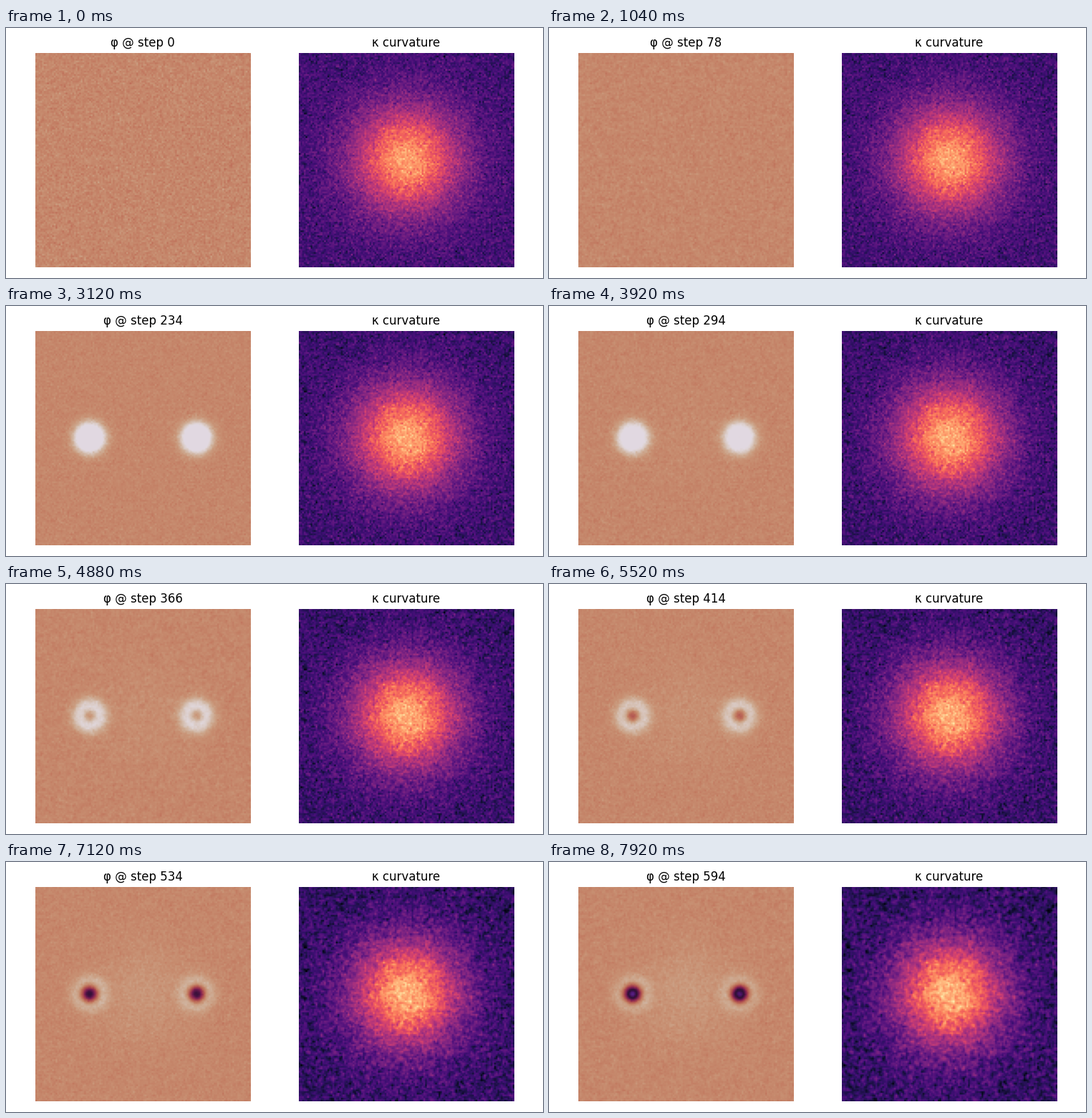
Animation of 750 by 350 pixels, one loop 8 s. Source, as a matplotlib script:

```python
import numpy as np
import matplotlib.pyplot as plt
from matplotlib.animation import FuncAnimation

W, H, DPI = 750, 350, 100
FRAMES, INTERVAL, STEPS_PER_FRAME = 100, 80, 6
LAST_STEP = (FRAMES - 1) * STEPS_PER_FRAME
N = 128             # grid cells per side
SIDE, BOTTOM = 300.5, 15
HALF = SIDE / 2
PULSE_STEP = 100

rng = np.random.default_rng(7)
axis = np.linspace(-HALF, HALF, N)
X, Y = np.meshgrid(axis, axis)
R2 = X**2 + Y**2
SPOTS = [(X - cx)**2 + Y**2 for cx in (-HALF / 2, HALF / 2)]
phi_a, phi_b, kappa_a, kappa_b = rng.standard_normal((4, N, N))


def level_of(cmap, rgb):
    """Colormap position whose colour is nearest to rgb."""
    grid = np.linspace(0, 1, 1024)
    dist = ((cmap(grid)[:, :3] * 255 - rgb)**2).sum(axis=1)
    return grid[dist.argmin()]


REST = level_of(plt.get_cmap("twilight"), (198, 136, 107))


def blur(f, s):
    """Mix each cell with its neighbours along both axes."""
    for ax in (0, 1):
        f = (1 - s) * f + s / 2 * (np.roll(f, 1, ax) + np.roll(f, -1, ax))
    return f


def noise(a, b, angle, smooth):
    f = blur(np.cos(angle) * a + np.sin(angle) * b, smooth)
    return f / f.std()


def progress(step, start):
    return max(0, (step - start) / (LAST_STEP - start))


def phi(step):
    grain = .008 + .005 * np.exp(-step / 50)
    smooth = .2 * np.sin(np.pi * step / 234)**2
    field = REST + grain * noise(phi_a, phi_b, step / 200, smooth)
    field += .028 * progress(step, 234) * np.exp(-R2 / 65**2)
    if step >= PULSE_STEP:
        # a fading bright spot, hollowed out by a narrower growing dip
        u = progress(step, PULSE_STEP)
        peak, dip = 1 - .27 * u, .44 + .73 * u
        for r2 in SPOTS:
            field += peak * np.exp(-r2 / 260) - dip * np.exp(-r2 / 175)
    return field


def kappa(step):
    t = progress(step, 0)
    floor, peak = .215 - .04 * t, .80 + .05 * t
    hill = floor + (peak - floor) * np.exp(-R2 / (.255 * HALF**2))
    return hill + .053 * noise(kappa_a, kappa_b, .6 * t, .33 * t**2)


def panel(center, data, cmap, title):
    ax = fig.add_axes([(center - HALF) / W, BOTTOM / H, SIDE / W, SIDE / H])
    ax.axis("off")
    image = ax.imshow(data, cmap=cmap, vmin=0, vmax=1)
    return image, ax.set_title(title, fontsize=12)


plt.rcParams["font.family"] = "DejaVu Sans"
fig = plt.figure(figsize=(W / DPI, H / DPI), dpi=DPI, facecolor="white")
phi_image, phi_title = panel(191.25, phi(0), "twilight", "φ @ step 0")
kappa_image, _ = panel(558.75, kappa(0), "magma", "κ curvature")


def update(frame):
    step = frame * STEPS_PER_FRAME
    phi_image.set_data(phi(step))
    kappa_image.set_data(kappa(step))
    phi_title.set_text(f"φ @ step {step}")
    return phi_image, kappa_image, phi_title


anim = FuncAnimation(fig, update, frames=FRAMES, interval=INTERVAL,
                     repeat=True, repeat_delay=0, blit=False)
plt.show()
```
